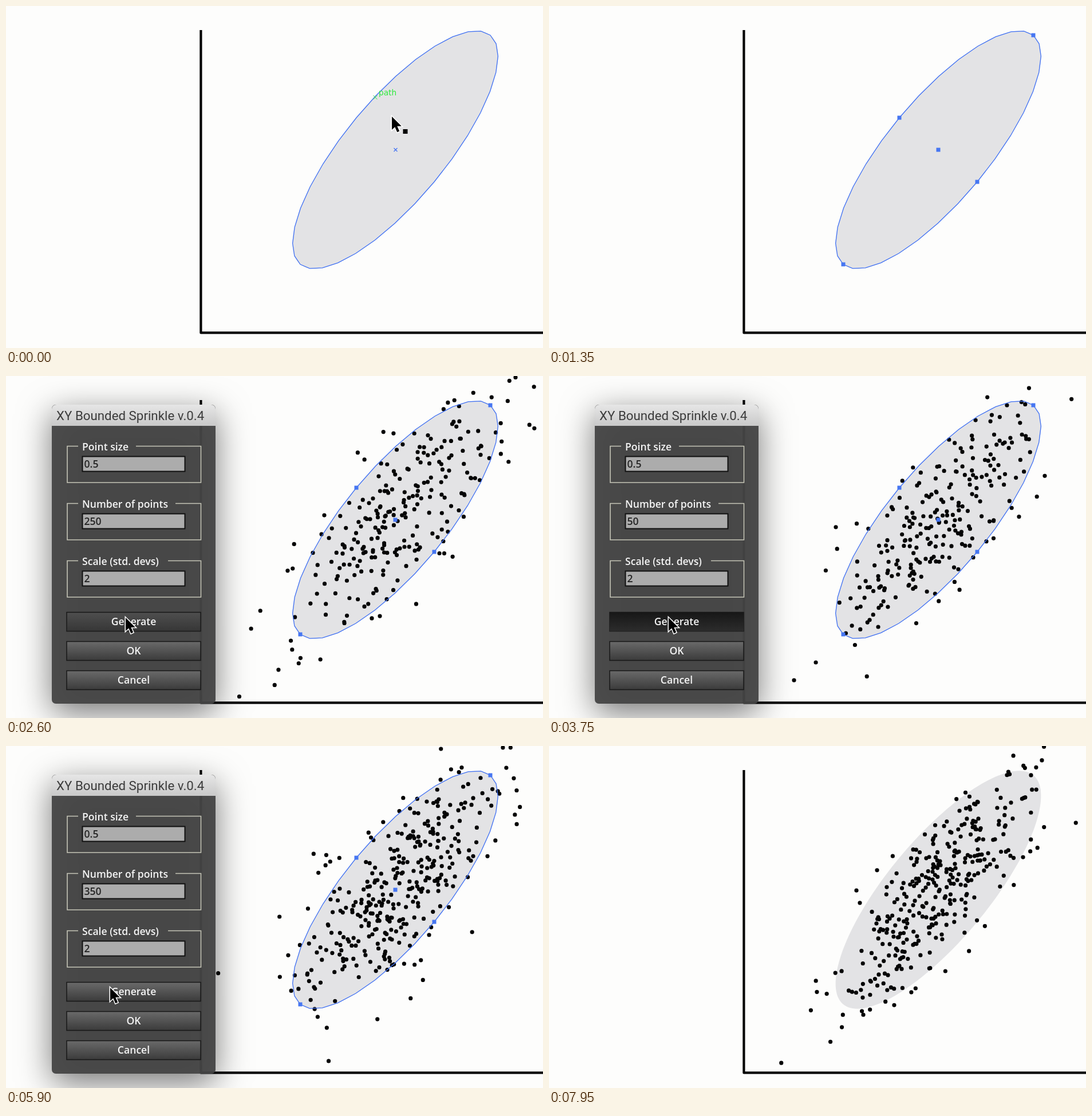
An HTML page for the animation above (8000 ms loop, 938 px wide and 597 px high).

```html
<!DOCTYPE html>
<html lang="en">
<head>
<meta charset="utf-8">
<title>Scatter in an ellipse</title>
<style>
  html, body { margin: 0; width: 100%; height: 100%; overflow: hidden; background: #fdfdfc; }
  svg { display: block; width: 100%; height: 100%; }
  .sys { font: 22.3px Roboto, "Liberation Sans", sans-serif; }
  .ui { font: 600 17.6px "Open Sans", "Noto Sans", sans-serif; fill: #f4f4f4; }
  .value { fill: #262626; }
  .mid { text-anchor: middle; }
  #panel { filter: drop-shadow(0 16px 29px rgba(0, 0, 0, .55)); }
  #files { filter: drop-shadow(0 22px 25px rgba(0, 0, 0, .62)); }
</style>
</head>
<body>
<svg viewBox="0 0 938 597">
  <defs>
    <linearGradient id="title" x2="0" y2="1"><stop stop-color="#e6e6e6"/><stop offset="1" stop-color="#c9c9c9"/></linearGradient>
    <linearGradient id="button" x2="0" y2="1"><stop stop-color="#6a6a6a"/><stop offset="1" stop-color="#3b3b3b"/></linearGradient>
    <linearGradient id="dark" x2="0" y2="1"><stop stop-color="#171717"/><stop offset="1" stop-color="#2c2c2c"/></linearGradient>
    <linearGradient id="pink" x2="0" y2="1"><stop stop-color="#f368b9"/><stop offset="1" stop-color="#e21c8c"/></linearGradient>
  </defs>

  <path d="M340.400 42V570.400H938" fill="none" stroke="#000" stroke-width="4.200" stroke-linejoin="round"/>
  <path id="oval" fill="#e3e3e5"/>
  <path id="dots" stroke="#050505" stroke-width="7.200" stroke-linecap="round"/>
  <path id="outline" fill="none" stroke="#3f70f4" stroke-width="1.300"/>
  <path id="anchors" fill="#4676f2"/>
  <g id="hover">
    <path d="m677.500 248 6 6m0-6-6 6" stroke="#3f70f4" stroke-width="1.200"/>
    <path d="m641.500 156 7 7m0-7-7 7" stroke="#2bea3a"/>
    <text x="651" y="156" fill="#2bea3a" font-family="DejaVu Sans, sans-serif" font-size="13.700">path</text>
  </g>

  <g id="files">
    <path d="M-60-60H878V497a8 8 0 0 1-8 8H-60Z" fill="#fdfdfd" stroke="#a8a8ac"/>
    <path d="M158.500-10V380" stroke="#d0d0d0"/>
    <path d="M-60 380.500H877.500V437H-60Z" fill="#c8c8c8"/>
    <path d="M-60 437H877.500V497a7.500 7.500 0 0 1-7.500 7.500H-60Z" fill="url(#title)"/>
    <path d="M-60 380.500H878M-60 437H878" stroke="#a6a6ac"/>
    <rect x="160.500" y="391.500" width="206" height="33" rx="5" fill="#fff" stroke="#b2b2b2"/>
    <path d="M340 391.500h21.500a5 5 0 0 1 5 5v23a5 5 0 0 1-5 5H340Z" fill="url(#pink)"/>
    <path d="m347.500 404 5.500-5.500 5.500 5.500m-11 8 5.500 5.500 5.500-5.500" fill="none" stroke="#fff" stroke-width="2"/>
    <rect x="593" y="456" width="126" height="32" rx="5" fill="#fff" stroke="#b8b8b8"/>
    <rect x="734" y="456" width="126" height="32" rx="5" fill="#dcdcdc" stroke="#c0c0c0"/>
    <g class="sys" fill="#1c1c1c">
      <text x="75" y="417">Enable:</text>
      <text x="174" y="417">Script Files</text>
      <text class="mid" x="655.500" y="480">Cancel</text>
      <text class="mid" x="797" y="480" fill="#a0a0a0">Open</text>
    </g>
  </g>

  <g id="panel">
    <rect x="80" y="50" width="286" height="522" rx="7" fill="#454545" fill-opacity=".95"/>
    <path d="M80 87V58a8 8 0 0 1 8-8H358a8 8 0 0 1 8 8V87Z" fill="url(#title)"/>
    <text class="sys" x="88" y="77" fill="#3c3c3c">XY Bounded Sprinkle v.0.4</text>
    <g id="controls"></g>
    <rect id="focus" x="131.500" width="183" height="31" fill="none" stroke="#c4732b" stroke-width="3"/>
    <path id="caret" d="M148.500 242V263" stroke="#000" stroke-width="2"/>
  </g>

  <g id="cursor">
    <path d="M1 2V25L6.300 20.200 10.300 29.200 14.200 27.500 10.300 18.700H17.800Z" stroke="#fff" stroke-width="3" paint-order="stroke"/>
    <path id="square" d="M20.500 24h8v8h-8Z"/>
  </g>
</svg>

<script>
const $ = id => document.getElementById(id);
const show = (id, on) => $(id).style.display = on ? '' : 'none';
const clamp = v => Math.min(1, Math.max(0, v));
const within = (t, from, to) => t >= from && t < to;

// Maps a point of the unit disc onto the tilted ellipse
const center = [680, 251], major = [166, -200], minor = [68, 56];
const place = (r, angle) => center.map((c, i) => c + r * (Math.cos(angle) * major[i] + Math.sin(angle) * minor[i]));

const ring = steps => 'M' + Array.from({ length: steps }, (_, i) => place(1, i / steps * 2 * Math.PI)).join('L') + 'Z';
$('oval').setAttribute('d', ring(160));
$('outline').setAttribute('d', ring(32)); // the editor draws its outline with few segments

const corners = [0, 1, 2, 3].map(i => place(1, i * Math.PI / 2));
$('anchors').setAttribute('d', [center, ...corners].map(([x, y]) => `M${x - 3.5} ${y - 3.5}h7v7h-7Z`).join(''));

// Panel controls
const fields = [['Point size', '0.5', 227], ['Number of points', '', 296], ['Scale (std. devs)', '2', 283]];
const buttons = ['Generate', 'OK', 'Cancel'];
$('controls').innerHTML = fields.map(([label, value, gap], i) => `<g transform="translate(0 ${i * 100})">
  <path d="M126 122.500H107V186H340.500V122.500H${gap}" fill="none" stroke="#c6c6b8" stroke-width="1.600"/>
  <text class="ui" x="133" y="129.500">${label}</text>
  <rect x="133.500" y="140.500" width="179" height="26" fill="#acacac" stroke="#111" stroke-width="2"/>
  <text class="ui value" id="value${i}" x="136.500" y="159.500">${value}</text></g>`).join('') +
  buttons.map((label, i) => `<g transform="translate(0 ${i * 51})">
  <rect x="106" y="412.500" width="234" height="33" fill="url(#button)" stroke="#171717" stroke-width="1.500"/>
  <rect id="press${i}" x="106" y="412.500" width="234" height="33" fill="url(#dark)"/>
  <text class="ui mid" x="223" y="434.500">${label}</text></g>`).join('');

// Gaussian samples; the ellipse marks two standard deviations
function cloud(count, seed) {
  const random = () => {
    seed = seed + 0x6D2B79F5 | 0;
    let n = Math.imul(seed ^ seed >>> 15, 1 | seed);
    n = n + Math.imul(n ^ n >>> 7, 61 | n) ^ n;
    return ((n ^ n >>> 14) >>> 0) / 4294967296;
  };
  let d = '';
  while (count--) {
    const r = Math.sqrt(-2 * Math.log(1 - random())) / 2;
    d += `M${place(r, random() * 2 * Math.PI)}h.01`;
  }
  return d;
}

// Clicks on Generate: time, number of points
const clicks = [[2150, 250], [2550, 250], [2900, 250], [3770, 50], [4350, 50], [5140, 350], [5600, 350], [6000, 350]];
const clouds = clicks.map(([, count], i) => cloud(count, i + 3));
const okClick = 6735, closed = 6800;

// Cursor stops: arrival time, x, y
const travel = 280;
const stops = [[450, 430, -40], [850, 387, 65], [1200, 330, -40], [1700, 147, 190], [2100, 208, 420],
  [3250, 150, 255], [3700, 208, 420], [4700, 148, 250], [5080, 181, 420], [6400, 189, 478], [7250, 226, 474]];

function position(t) {
  return stops.reduce((from, [arrival, ...to]) => {
    const k = clamp((t - arrival) / travel + 1), ease = k * k * (3 - 2 * k);
    return from.map((v, i) => v + (to[i] - v) * ease);
  }, [673, 191]);
}

const pressed = (t, click) => clamp(1.6 - Math.abs(t - click) / 40);

function focusedField(t) {
  if (t < clicks[0][0]) return 2;
  return within(t, 3250, 3700) || within(t, 4700, 5140) ? 1 : -1;
}

let drawn;
function render(t) {
  const last = clicks.findLastIndex(([click]) => click <= t), focus = focusedField(t);
  if (last !== drawn) $('dots').setAttribute('d', clouds[drawn = last] || '');
  show('hover', t < 200);
  show('outline', t < 7700);
  show('anchors', within(t, 200, 7700));
  show('files', within(t, 800, 1300));
  show('panel', within(t, 1450, closed));
  show('focus', focus >= 0);
  $('focus').setAttribute('y', 138 + focus * 100);
  show('caret', within(t, 4850, 5140));
  $('value1').textContent = t < 3350 ? '250' : t < 4850 ? '50' : '350';
  $('press0').setAttribute('opacity', Math.max(...clicks.map(([click]) => pressed(t, click))));
  $('press1').setAttribute('opacity', pressed(t, okClick));
  $('press2').setAttribute('opacity', 0);
  show('cursor', t < 7900);
  show('square', t < 200);
  $('cursor').setAttribute('transform', `translate(${position(t)})`);
}

const began = performance.now();
(function tick() {
  render((performance.now() - began) % 8000);
  requestAnimationFrame(tick);
})();
</script>
</body>
</html>
```
